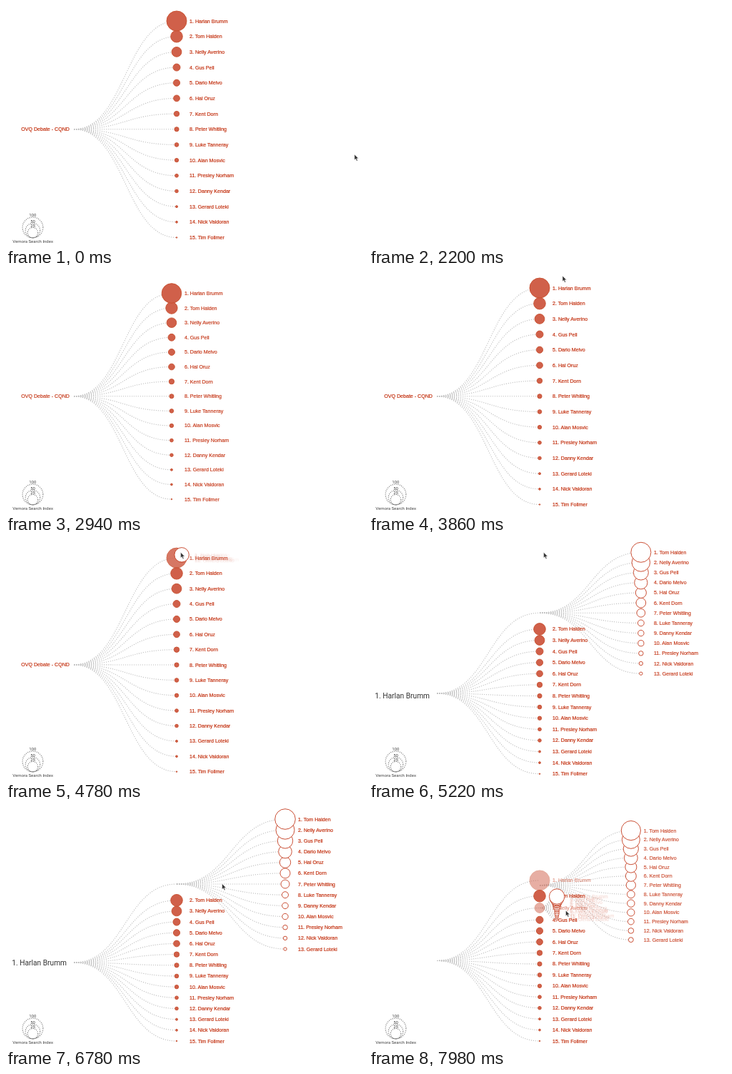
Recreate the animation shown at these times as an HTML page. Size 500 by 335 pixels, loop 8000 ms.

```html
<!DOCTYPE html>
<html lang="en">
<head>
<meta charset="utf-8">
<title>Debate search tree</title>
<style>
  html, body { margin: 0; width: 100%; height: 100%; overflow: hidden; background: #fff; }
  svg { display: block; width: 100vw; height: 100vh; }
  text { font: 7.1px "Liberation Sans", Arial, sans-serif; fill: #c02806; stroke: #c02806; stroke-width: .16; }
  .link { fill: none; stroke: #c0c0c0; stroke-width: 1.1; stroke-dasharray: 1.2 1.8; }
  .dot { fill: #d0604a; stroke: #c8502f; stroke-width: .9; }
  .ring { fill: #fff; stroke: #c8472c; stroke-width: .95; }
  .root { text-anchor: end; }
  .big { font: 10.2px Roboto, sans-serif; fill: #333; stroke: none; }
  #legend circle { fill: none; stroke: #777; stroke-width: 1.1; stroke-dasharray: 1.1 1.5; }
  #legend text { font: 6px Roboto, sans-serif; fill: #444; stroke: none; text-anchor: middle; }
</style>
</head>
<body>
<svg viewBox="0 0 500 335">
  <g id="scene">
    <g id="links"></g>
    <g id="nodes"></g>
    <g id="legend">
      <circle cx="37.5" cy="310.5" r="14.4"/>
      <circle cx="37.5" cy="314.7" r="10.2"/>
      <circle cx="37.5" cy="317.7" r="7.2"/>
      <text x="37.3" y="295.3">100</text>
      <text x="37.5" y="303.8">50</text>
      <text x="37.5" y="310.3">25</text>
      <text x="37.6" y="332">Vemora Search Index</text>
    </g>
  </g>
  <path id="cursor" d="M0 0V7.8L1.8 6.2 3.1 9.2 4.5 8.6 3.2 5.7H5.7Z" fill="#333" stroke="#fff" stroke-width=".5"/>
</svg>
<script>
const LOOP = 8000, MOVE = 850, FADE = 580;
const BLANK = 2200, GROW = 2287, OPEN1 = 4588, OPEN2 = 7691;
const ROOT_X = 95, MAIN_X = 239, SUB_X = 391, GAP = 18;

const names = ["Harlan Brumm", "Tom Halden", "Nelly Averino", "Gus Pell", "Dario Melvo",
  "Hal Oruz", "Kent Dorn", "Peter Whitling", "Luke Tanneray", "Alan Mosvic",
  "Presley Norham", "Danny Kendar", "Gerard Loteki", "Nick Valdoran", "Tim Follmer"];
const radii = [14, 8.3, 6.9, 5, 4.6, 4.4, 3.7, 3.1, 2.8, 2.7, 2.4, 2.3, 1.5, 1.4, .8];
const subRadii = [14.3, 13, 10.7, 9.3, 7.7, 7, 6, 4.5, 4.3, 4.2, 3.3, 2.7, 2.2];
const order1 = [1, 2, 3, 4, 5, 6, 7, 8, 11, 9, 10, 13, 12];
const order2 = [0, 1, 3, 4, 5, 6, 7, 8, 11, 9, 10, 13, 12];

// time, x, y of the pointer tip
const pointer = [
  [0, 488, 208], [540, 488, 208], [580, 502, 208], [3180, 502, 208], [3181, 331, -12],
  [3640, 271, 4], [3860, 271, 4], [4140, 244.6, 17.3], [5700, 244.6, 17.3],
  [6340, 387, 19], [6540, 387, 19], [6780, 302.6, 107.6], [7340, 274, 141],
  [7700, 274, 141], [7960, 275.5, 145], [8000, 275.5, 145]
];

const $ = id => document.getElementById(id);
const clamp = v => Math.max(0, Math.min(1, v));
const mix = (a, b, p) => a + (b - a) * p;
const ease = v => (v = clamp(v), v < .5 ? 4 * v ** 3 : 1 - 4 * (1 - v) ** 3);
const smooth = v => v * v * (3 - 2 * v);

function set(el, attrs) {
  for (const k in attrs) el.setAttribute(k, attrs[k]);
}

function add(parent, tag, cls, text) {
  const el = document.createElementNS(parent.namespaceURI, tag);
  el.setAttribute("class", cls);
  if (text) el.textContent = text;
  return parent.appendChild(el);
}

// Vertical places of the main list, of the root and of the open branch
function layout(open) {
  let ys, sub = [];
  if (open < 0) ys = names.map((_, i) => 21 + i * 21.68);
  else {
    const step = 311 / (20.5 - open), mid = 17 + 6 * step;
    ys = names.map((_, i) => {
      const d = i - open;
      return mid + step * (d + Math.sign(d) * .5);
    });
    sub = subRadii.map((_, i) => 17 + i * step);
  }
  return { ys, sub, root: (ys[0] + ys[14]) / 2 };
}
const closed = layout(-1), first = layout(0), third = layout(2);

// Later rows lie beneath earlier ones
function makeList(indices, cls) {
  const links = add($("links"), "g", ""), nodes = add($("nodes"), "g", "");
  const items = [];
  for (let i = indices.length - 1; i >= 0; i--) {
    items[i] = {
      link: add(links, "path", "link"),
      dot: add(nodes, "circle", cls),
      label: add(nodes, "text", "", `${i + 1}. ${names[indices[i]]}`)
    };
  }
  return { items, links, nodes };
}

function place(item, x0, y0, x, y, r, alpha, textAlpha) {
  const m = (x0 + x) / 2;
  set(item.link, { d: `M${x0} ${y0}C${m} ${y0} ${m} ${y} ${x} ${y}` });
  set(item.dot, { cx: x, cy: y, r, opacity: alpha });
  set(item.label, { x: x + GAP, y: y + 2.5, opacity: textAlpha });
}

function show(list, on) {
  list.links.style.display = list.nodes.style.display = on ? "" : "none";
}

const main = makeList(names.map((_, i) => i), "dot");
const sub1 = makeList(order1, "ring"), sub2 = makeList(order2, "ring");
const titles = ["OVQ Debate - CQND", "1. " + names[0], "3. " + names[2]]
  .map((s, i) => add($("nodes"), "text", i ? "root big" : "root", s));

function enterSub(list, from, to, open, p) {
  const y0 = mix(from.ys[open], to.ys[open], p);
  list.items.forEach((item, i) => place(item, MAIN_X, y0,
    mix(MAIN_X, SUB_X, p), mix(from.ys[open], to.sub[i], p),
    subRadii[i] * mix(.7, 1, p), 1, p));
}

function leaveSub(list, from, open, goal, p) {
  const y0 = mix(from.ys[open], goal, p);
  list.items.forEach((item, i) => place(item, MAIN_X, y0,
    mix(SUB_X, MAIN_X, p), mix(from.sub[i], goal, p),
    mix(subRadii[i], 10, p), 1, 1 - p));
}

function movePointer(t) {
  const i = pointer.findIndex(k => k[0] > t);
  const a = pointer[i - 1], b = pointer[i];
  const p = smooth((t - a[0]) / (b[0] - a[0]));
  set($("cursor"), { transform: `translate(${mix(a[1], b[1], p)} ${mix(a[2], b[2], p)})` });
}

function draw(t) {
  movePointer(t);
  $("scene").style.display = t >= BLANK && t < GROW ? "none" : "";

  const phase = t < OPEN1 ? 0 : t < OPEN2 ? 1 : 2;
  const ms = t - [GROW, OPEN1, OPEN2][phase];
  const p = t < BLANK ? 1 : ease(ms / MOVE), q = ease(ms / FADE);
  const from = [closed, closed, first][phase], to = [closed, first, third][phase];
  const rootY = mix(from.root, to.root, p);
  const grow = phase ? 1 : p;

  main.items.forEach((item, i) => {
    let alpha = 1;
    if (phase === 1 && i === 0 || phase === 2 && i === 2) alpha = 1 - q;
    if (phase === 2 && i === 0) alpha = q;
    const y = phase ? mix(from.ys[i], to.ys[i], p) : mix(closed.root, closed.ys[i], p);
    place(item, ROOT_X, rootY, mix(ROOT_X, MAIN_X, grow), y,
      radii[i] * mix(.7, 1, grow), alpha, alpha * grow);
  });

  show(sub1, phase > 0);
  show(sub2, phase > 1);
  if (phase === 1) enterSub(sub1, from, to, 0, p);
  if (phase === 2) {
    leaveSub(sub1, from, 0, to.ys[2], p);
    enterSub(sub2, from, to, 2, p);
  }

  // The old title drifts and fades; the new one appears at its final height
  titles.forEach((el, i) => {
    let alpha = 0;
    if (i === phase) alpha = phase ? clamp((ms - 300) / 250) : p;
    if (i === phase - 1) alpha = 1 - clamp((ms - 190) / 90);
    const y = i === phase ? to.root : rootY;
    set(el, { x: i ? 85 : 89, y: y + (i ? 3.6 : 2.5), opacity: alpha });
  });
}

const start = performance.now();
function tick() {
  draw((performance.now() - start) % LOOP);
  requestAnimationFrame(tick);
}
tick();
</script>
</body>
</html>
```
